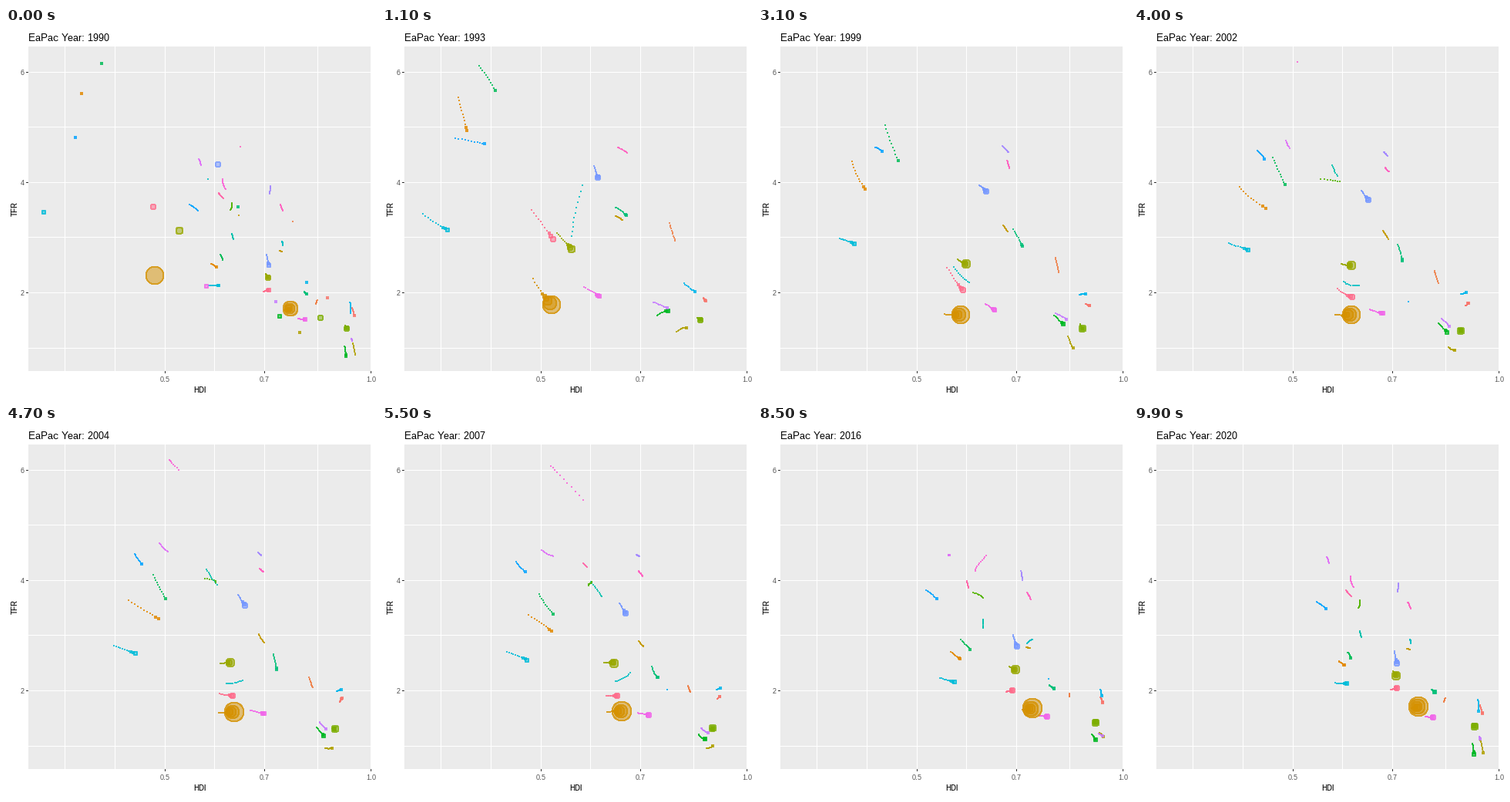
Recreate the animation shown at these times as a matplotlib script. Size 480x480 px, loop 10 s.

```python
import numpy as np
import matplotlib.pyplot as plt
from matplotlib.animation import FuncAnimation
from matplotlib.patches import Rectangle

SIZE, FRAMES, WAKE, HUES = 480, 100, 10, 28
FIRST, LAST = 1990, 2020
LEFT, TOP, RIGHT, BOTTOM = 29, 24, 474, 445
MAX_POP, GROWTH = 1411, 0.25

plt.rcParams.update({"font.family": "Liberation Sans",
                     "text.hinting": "native", "text.hinting_factor": 1})


def hcl(hue, chroma=100, lum=65):
    """Polar LUV colour to sRGB."""
    a = np.radians(hue)
    u = chroma * np.cos(a) / (13 * lum) + 0.1978
    v = chroma * np.sin(a) / (13 * lum) + 0.4683
    y = ((lum + 16) / 116) ** 3
    xyz = [9 * y * u / (4 * v), y, y * (12 - 3 * u - 20 * v) / (4 * v)]
    lin = np.array([[3.2405, -1.5371, -0.4985],
                    [-0.9693, 1.8760, 0.0416],
                    [0.0556, -0.2040, 1.0572]]) @ xyz
    lin = np.clip(lin, 0, 1)
    return np.where(lin > 0.00304, 1.055 * lin ** (1 / 2.4) - 0.055, 12.92 * lin)


def spline(t, keys, values):
    """Cubic Hermite curve through unevenly spaced keys."""
    slope = np.gradient(values, keys, axis=0, edge_order=2)
    i = np.clip(np.searchsorted(keys, t, side="right") - 1, 0, len(keys) - 2)
    span = (keys[i + 1] - keys[i])[:, None]
    u = (t - keys[i])[:, None] / span
    ease = u * u * (3 - 2 * u)
    bend = u * (1 - u) * ((1 - u) * slope[i] - u * slope[i + 1]) * span
    return values[i] + ease * (values[i + 1] - values[i]) + bend


layers = [[] for _ in range(FRAMES)]


def place(hue, pop, frame, xy):
    people = pop * (1 + GROWTH * frame / (FRAMES - 1))
    size = 0.5 + 11.5 * np.sqrt(people / MAX_POP)
    layers[frame].append((*xy, size, *hcl(15 + 360 * hue / HUES)))


def track(hue, pop, *points, start=0):
    """A bubble (population in millions) moving through points, closer in time early on."""
    end = FRAMES - 1
    keys = start + (end - start) * np.linspace(0, 1, len(points)) ** 1.3
    frames = np.arange(start, FRAMES)
    for frame, xy in zip(frames, spline(frames, keys, np.array(points, float))):
        place(hue, pop, frame, xy)


track(0, 17, (417, 350), (420, 354), (430, 360), (437, 352), (444, 352), (452, 373))
track(1, .3, (372, 251), (381, 279), (390, 315), (399, 343), (404, 347), (402, 358))
track(2, 10, (98, 85), (112, 138), (137, 206), (210, 258), (249, 292), (273, 310))
track(3, 1135, (193, 321), (223, 362), (261, 372), (304, 370), (342, 368), (369, 364))
track(4, .7, (302, 243), (313, 250), (323, 263), (337, 284), (348, 287), (358, 290))
track(5, 6, (381, 395), (396, 389), (408, 414), (426, 417), (442, 398), (453, 424))
track(6, 190, (225, 263), (248, 289), (269, 306), (296, 307), (325, 312), (340, 324))
track(7, 115, (408, 376), (414, 379), (421, 390), (428, 393), (435, 384), (442, 390))
track(8, .1, (242, 196), (269, 200), (268, 206), (268, 212), (290, 221), (291, 236), start=33)
track(9, 43, (355, 374), (373, 367), (395, 383), (416, 405), (433, 400), (441, 426))
track(10, 5, (124, 46), (149, 86), (180, 168), (214, 234), (262, 276), (281, 301))
track(11, 20, (301, 232), (319, 245), (342, 281), (354, 322), (377, 336), (390, 345))
track(13, .1, (257, 178), (265, 194), (283, 218), (292, 240), (292, 259), (295, 274), start=33)
track(14, 2.4, (262, 196), (246, 276), (272, 329), (315, 326), (348, 283), (359, 282))
track(15, 42, (49, 239), (88, 264), (123, 279), (178, 299), (234, 326), (276, 334))
track(16, 4, (390, 330), (408, 343), (424, 345), (437, 341), (444, 341), (447, 370))
track(18, 6, (90, 142), (137, 151), (160, 159), (180, 184), (217, 212), (249, 237))
track(19, 70, (275, 177), (281, 196), (295, 211), (313, 238), (330, 270), (341, 308))
track(20, .2, (312, 146), (322, 158), (329, 166), (335, 171), (342, 192), (342, 215), start=16)
track(21, 4, (350, 355), (372, 364), (399, 377), (419, 396), (441, 399), (449, 406))
track(22, .4, (197, 146), (203, 157), (219, 168), (243, 170), (248, 167), (253, 178), start=33)
track(23, 57, (260, 335), (284, 349), (306, 365), (341, 374), (364, 376), (388, 378))
track(24, .8, (212, 44), (225, 58), (274, 110), (299, 156), (282, 186), (285, 209), start=40)
track(25, .1, (304, 154), (319, 163), (326, 181), (336, 192), (349, 215), (359, 237))
track(26, .2, (261, 178), (267, 184), (271, 192), (271, 201), (274, 211), (282, 221), start=50)
track(27, 72, (191, 232), (225, 278), (264, 338), (300, 350), (321, 345), (341, 340))

# Places measured only in single years
place(12, .05, 69, (295, 196))
place(17, .02, 33, (356, 355))
place(17, .02, 50, (370, 342))
place(17, .02, 82, (377, 328))

layers = [np.array(layer) for layer in layers]

fig = plt.figure(figsize=(SIZE / 72, SIZE / 72), dpi=72, facecolor="white")
ax = fig.add_axes([0, 0, 1, 1])
ax.set(xlim=(0, SIZE), ylim=(SIZE, 0))
ax.axis("off")


def box(x, y, w, h, color):
    ax.add_patch(Rectangle((x, y), w, h, fc=color, lw=0, zorder=0))


box(LEFT, TOP, RIGHT - LEFT, BOTTOM - TOP, "#EBEBEB")
for x in (76, 141, 206, 270, 335, 404, 473):
    box(x, TOP, 1, BOTTOM - TOP, "white")
for y in (57, 128, 200, 271, 343, 415):
    box(LEFT, y, RIGHT - LEFT, 1, "white")
for x, label in (206, "0.5"), (335, "0.7"), (473, "1.0"):
    box(x, BOTTOM, 1, 3, "#333333")
    ax.text(x + 0.5, 459, label, size=9, color="#4D4D4D", ha="center")
for y, label in (57, "6"), (200, "4"), (343, "2"):
    box(LEFT - 3, y, 3, 1, "#333333")
    ax.text(24, y + 4, label, size=9, color="#4D4D4D", ha="right")
ax.text(251, 473, "HDI", size=11, ha="center")
ax.text(17, 234, "TFR", size=11, rotation=90, ha="right", va="center")
title = ax.text(LEFT, 17, "", size=13)
dots = ax.scatter([], [], linewidths=1, antialiased=False, zorder=2)


def draw(frame):
    rows = []
    for age in range(WAKE, -1, -1):
        layer = layers[(frame - age) % FRAMES].copy()
        layer[:, 2] *= (1 - age / WAKE) ** 3
        rows.append(layer)
    rows = np.concatenate(rows)

    # Whole-pixel centres and radii, with the outline inside the radius
    radius = np.maximum(1, np.round(0.375 * (2.845 * rows[:, 2] + 0.94)))
    dots.set_offsets(np.round(rows[:, :2]))
    dots.set_sizes((2 * radius - 1) ** 2)
    dots.set_facecolors(np.insert(rows[:, 3:], 3, 0.5, axis=1))
    dots.set_edgecolors(np.insert(rows[:, 3:], 3, 0.7, axis=1))

    year = FIRST + (LAST - FIRST) * frame / (FRAMES - 1)
    title.set_text(f"EaPac Year: {round(year)}")
    return dots, title


anim = FuncAnimation(fig, draw, frames=FRAMES, interval=100, repeat=True, repeat_delay=0)
plt.show()
```
